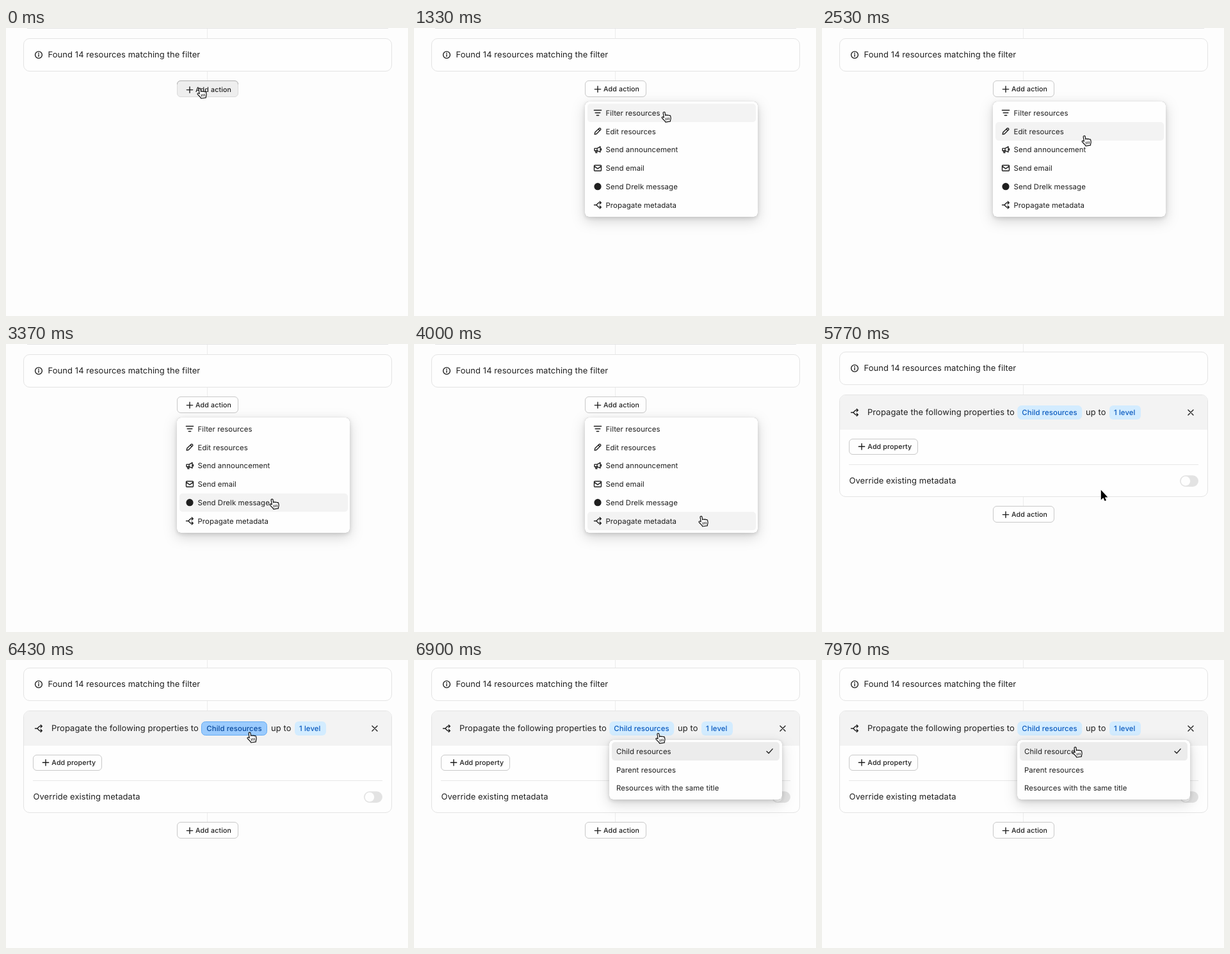
These frames come from a looping animation (628x450 px, 8000 ms). An HTML page:

```html
<!DOCTYPE html>
<html lang="en">
<head>
<meta charset="utf-8">
<title>Add action</title>
<style>
html, body { margin: 0; width: 100%; height: 100%; overflow: hidden; background: #fdfdfd; }
svg { display: block; width: 628px; height: 450px; }
text { font-family: Inter, "Open Sans", sans-serif; fill: #1f1f1f; white-space: pre; text-rendering: geometricPrecision; }
.body { font-size: 12.95px; letter-spacing: .09px; }
.item { font-size: 11.45px; letter-spacing: .07px; }
.btn { font-size: 10.65px; font-weight: 500; letter-spacing: .13px; }
.chip { font-size: 11.4px; font-weight: 500; letter-spacing: .07px; fill: #0c5cc0; }
.icon { fill: none; stroke: #1f1f1f; stroke-width: 1.4; stroke-linecap: round; stroke-linejoin: round; }
.box { fill: #fefefe; stroke: #e4e4e4; }
.button { fill: #fefefe; stroke: #c9c9c9; }
.panel { fill: #fefefe; filter: drop-shadow(0 0 .6px rgba(0,0,0,.45)) drop-shadow(0 2px 3px rgba(0,0,0,.13)) drop-shadow(0 6px 10px rgba(0,0,0,.17)); }
</style>
</head>
<body>
<svg id="stage" viewBox="0 0 628 450"></svg>
<script>
const ROW = 28.8, CLICK = 4670, OPEN = 230, PICK = 6570, LOOP = 8000;

const text = (x, y, s, cls) => `<text x="${x}" y="${y}" class="${cls}">${s}</text>`;
const rect = (x, y, w, h, r, attrs) =>
  `<rect x="${x}" y="${y}" width="${w}" height="${h}" rx="${r}" ${attrs}/>`;
const icon = (x, y, d, extra = '') =>
  `<g transform="translate(${x} ${y})" class="icon"><path d="${d}"/>${extra}</g>`;
const group = (id, body) => `<g id="${id}">${body}</g>`;

const PLUS = 'M-4.7 0H4.7M0-4.7V4.7';
const BRANCH = 'M-5.5 0H-2.2L1.4-3.6H5M-2.2 0L1.4 3.6H5M3.2-5.6L5.3-3.6 3.2-1.6M3.2 1.6L5.3 3.6 3.2 5.6';
const dot = '<circle r="5.6" fill="#1f1f1f" stroke="none"/>';

const actions = [
  ['Filter resources', 'M-5.6-4H5.6M-3.8 0H3.8M-1.7 4H1.7'],
  ['Edit resources', 'M-4.8 4.8L-4.2 1.8 2.2-4.6Q3.3-5.3 4.4-4.2 5.3-3.1 4.5-2.2L-1.9 4.2ZM1-3.2L3.2-1'],
  ['Send announcement', 'M-5-2H-1L4-4.8V3.8L-1 1.6H-5ZM-1-2V1.6M-3.6 1.8L-3 4.8H-1.2L-1.4 1.8M5.5-1.6V.8'],
  ['Send email', 'M-4.4-4.4H4.4Q5.5-4.4 5.5-3.3V3.3Q5.5 4.4 4.4 4.4H-4.4Q-5.5 4.4-5.5 3.3V-3.3Q-5.5-4.4-4.4-4.4ZM-5.2-2.8L0 1 5.2-2.8'],
  ['Send Drelk message', '', dot],
  ['Propagate metadata', BRANCH]
];
const targets = ['Child resources', 'Parent resources', 'Resources with the same title'];

const menuRows = actions.map(([label, d, extra], i) => {
  const y = 132.5 + ROW * i;
  return group('row' + i, icon(287, y, d, extra) + text(299.5, y + 4.2, label, 'item'));
}).join('');
const pickRows = targets.map((label, i) => text(316, 146.7 + ROW * i, label, 'item')).join('');

document.getElementById('stage').innerHTML =
  rect(0, 0, 628, 450, 0, 'fill="#fdfdfd"') +
  '<path id="spine" stroke="#ececec"/>' +
  group('head',
    '<path d="M33 .5H597" stroke="#e4e4e4"/>' +
    rect(27.5, 16.5, 575, 51, 9.5, 'class="box"') +
    icon(51, 42, 'M0-.4V2.6', '<circle r="5.4"/><circle cy="-2.5" r=".9" fill="#1f1f1f" stroke="none"/>') +
    text(65.5, 46.2, 'Found 14 resources matching the filter', 'body')) +
  group('card',
    rect(27.5, 79.5, 575, 159, 9.5, 'class="box"') +
    '<path d="M28 134V89Q28 80 37 80H593Q602 80 602 89V134Z" fill="#f3f3f3"/>' +
    icon(51, 107, BRANCH) +
    text(71, 111.3, 'Propagate the following properties to', 'body') +
    rect(305.5, 96.5, 100.5, 21, 6, 'id="chip"') +
    text(0, 111, 'Child resources', 'chip').replace('<text', '<text id="chipText"') +
    group('after',
      text(412, 111.3, 'up to', 'body') +
      rect(449, 96, 49, 22, 6, 'fill="#d3ecff"') +
      text(456, 111, '1 level', 'chip')) +
    icon(576, 107, 'M-4-4L4 4M4-4L-4 4') +
    rect(42.5, 148.5, 107, 24, 5.5, 'class="button"') +
    icon(62, 160.3, PLUS) +
    text(71.3, 164.1, 'Add property', 'btn') +
    '<path d="M42 188.5H588" stroke="#e8e8e8"/>' +
    text(42.5, 218, 'Override existing metadata', 'body') +
    rect(559, 205.3, 29, 17.6, 8.8, 'fill="#e3e3e3"') +
    '<circle cx="568" cy="214.1" r="7.3" fill="#fefefe"/>') +
  group('add',
    rect(267.5, 82.5, 95, 25, 5.5, 'id="addBox" class="button"') +
    '<path id="inset" d="M267.5 88Q267.5 82.5 273 82.5H357Q362.5 82.5 362.5 88" fill="none" stroke="#000" stroke-opacity=".2"/>' +
    group('addLabel', icon(287, 95.6, PLUS) + text(296, 99.1, 'Add action', 'btn'))) +
  group('menu',
    rect(267, 115, 270, 180, 6, 'id="menuBox" class="panel"') +
    rect(271, 0, 263, ROW, 5, 'id="hover" fill="#f3f3f3"') + menuRows) +
  group('pick',
    rect(305, 125, 270, 93, 6, 'class="panel"') +
    rect(309, 128.3, 262, ROW, 5, 'fill="#ececec"') + pickRows +
    icon(555.5, 142.5, 'M-4.5 .3L-1.4 3.3 4.7-3.6')) +
  group('cursor',
    `<g id="hand" transform="translate(-1.6 -.3) rotate(-9)" stroke="#111" stroke-linejoin="round" stroke-linecap="round">
      <path d="M-1.6 9V1.7C-1.6 .1 1.3 .1 1.3 1.7V6.3C1.7 5.2 3.8 5.3 4 6.6 4.6 5.8 6.5 6 6.6 7.3 7.5 6.7 9 7.2 9 8.6V11.2C9 13 7.7 14 7.5 16.5H-.2C-.4 14.5-2 13.3-3 11.7L-4.6 9.3C-5.3 8-3.6 7.2-2.6 8.1Z" fill="#fff" stroke-width="1.2"/>
      <path d="M1.2 10.5V13.6M3.6 10.5V13.6M6 10.5V13.6" stroke-width=".9" fill="none"/>
    </g>
    <path id="arrow" d="M0-1V14.4L3.6 11.2 5.9 16.2 8.2 15.2 6 10.4H10.6Z" fill="#000" stroke="#fff" stroke-width="1" paint-order="stroke"/>`);

const el = {};
document.querySelectorAll('[id]').forEach(n => el[n.id] = n);
const set = (id, name, value) => el[id].setAttribute(name, value);
const show = (id, on) => set(id, 'display', on ? 'inline' : 'none');
const shift = (id, x, y) => set(id, 'transform', `translate(${x} ${y})`);
const ramp = (t, a, b) => Math.min(1, Math.max(0, (t - a) / (b - a)));
const easeOut = p => 1 - (1 - p) ** 2;

// Pointer tip: time, x, y
const path = [
  [0, 304, 94], [870, 304, 94], [1100, 356, 117], [1330, 392, 131], [1670, 416, 144],
  [1690, 416, 144], [1800, 412, 160], [2010, 412, 160], [2100, 411, 168], [2510, 411, 168],
  [2850, 423, 207], [3170, 417, 242], [3350, 417, 242], [4000, 450, 269], [5180, 450, 269],
  [5270, 446, 263], [5550, 446, 263], [5950, 421, 187], [6370, 382, 113], [6850, 382, 113],
  [7200, 397, 136], [8000, 397, 136]
];

// Tangent at a key; zero where the pointer rests on either side
function slope(i, k) {
  const a = path[i - 1], b = path[i], c = path[i + 1];
  const still = (p, q) => !p || !q || (p[1] === q[1] && p[2] === q[2]);
  return still(a, b) || still(b, c) ? 0 : (c[k] - a[k]) / (c[0] - a[0]);
}

function pointer(t) {
  let i = 0;
  while (i < path.length - 2 && t >= path[i + 1][0]) i++;
  const a = path[i], b = path[i + 1], d = b[0] - a[0], p = (t - a[0]) / d;
  return [1, 2].map(k =>
    a[k] + (b[k] - a[k]) * p * p * (3 - 2 * p) +
    d * p * (1 - p) * (slope(i, k) * (1 - p) - slope(i + 1, k) * p));
}

function draw(t) {
  const [x, y] = pointer(t);
  const added = t >= CLICK, pressed = t < OPEN;
  const drop = added ? 171 : 0;

  shift('head', 0, added ? -4 : 0);
  show('card', added);
  set('spine', 'd', `M314.5 0V${84 + drop}`);
  shift('add', 0, drop);
  set('addBox', 'style', pressed ? 'fill:#eee;stroke:#dadada' : '');
  show('inset', pressed);
  shift('addLabel', 0, pressed ? 1 : 0);

  const fade = added ? (1 - ramp(t, CLICK, 4830)) ** 2.3 : easeOut(ramp(t, OPEN - 30, 430));
  show('menu', !pressed && fade > 0);
  set('menu', 'opacity', fade);
  shift('menu', 0, drop);
  set('menuBox', 'height', added ? 151 : 180);
  show('row5', !added);
  const row = Math.floor((y - 118.3) / ROW);
  show('hover', !added && row >= 0);
  set('hover', 'y', 118.3 + ROW * Math.max(0, row));

  const active = t > 5570 && t < PICK && y < 118;
  set('chip', 'x', active ? 305.5 : 305.75);
  set('chip', 'width', active ? 102 : 100);
  set('chip', 'fill', active ? '#9bcbfd' : '#d3ecff');
  set('chip', 'stroke', active ? '#64abf3' : '#d3ecff');
  set('chipText', 'x', active ? 313.3 : 312.3);
  set('chipText', 'style', active ? 'fill:#0a4a9e' : '');
  shift('after', active ? 2 : 0, 0);

  show('pick', t >= PICK);
  set('pick', 'opacity', easeOut(ramp(t, PICK - 30, PICK + 200)));

  const hand = added ? active || t >= PICK : y < 108 || y > 115;
  show('hand', hand);
  show('arrow', !hand);
  shift('cursor', x.toFixed(2), y.toFixed(2));
}

const start = performance.now();
function tick() {
  draw((performance.now() - start) % LOOP);
  requestAnimationFrame(tick);
}
draw(0);
requestAnimationFrame(tick);
</script>
</body>
</html>
```
